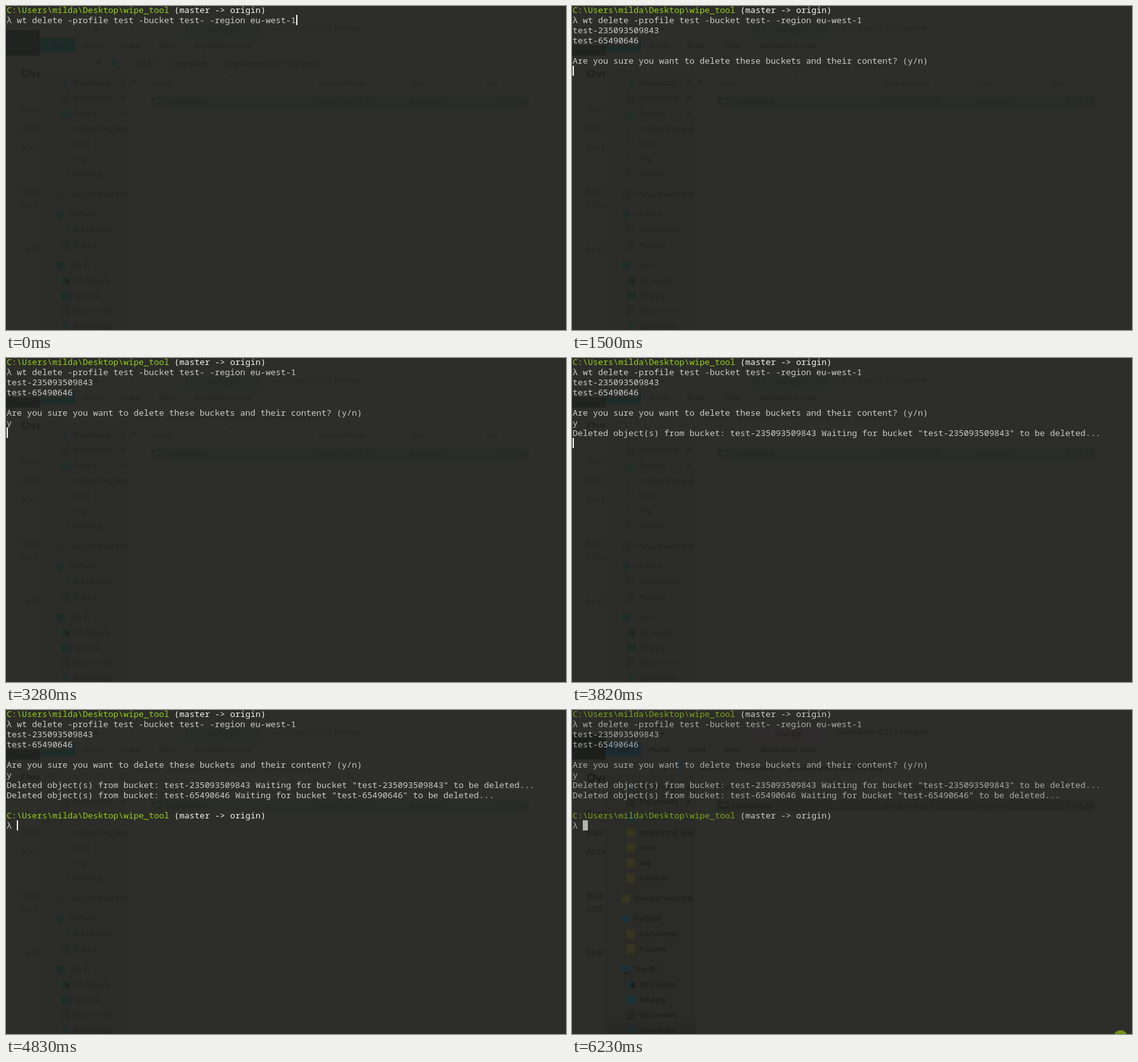
Animation of 882x511 px, one loop 6470 ms. Source, as an HTML page with a canvas:

```html
<!DOCTYPE html>
<html lang="en">
<head>
<meta charset="utf-8">
<title>Terminal session</title>
<style>
html, body { margin: 0; width: 100%; height: 100%; overflow: hidden; background: #2d2d29; }
canvas { display: block; }
</style>
</head>
<body>
<canvas id="stage" width="882" height="511"></canvas>
<script>
const ctx = document.getElementById('stage').getContext('2d');
const LOOP = 6470, BLUR_AT = 6230, CELL = 8, ROW = 16;
const MONO = '13.3333px "Noto Sans Mono", "DejaVu Sans Mono", monospace';
const UI = '"Open Sans", "Noto Sans", sans-serif';
const BASE = '#2d2d29';

const PATH = 'C:\\Users\\milda\\Desktop\\wipe_tool';
const BRANCH = ' (master -> origin)';
const BUCKETS = ['test-235093509843', 'test-65490646'];
const deleted = b => `Deleted object(s) from bucket: ${b}`;
const waiting = b => ` Waiting for bucket "${b}" to be deleted...`;

// [time, row, column, text, kind]
const prints = [
  [0, 0, 0, PATH, 'path'],
  [0, 0, PATH.length, BRANCH, 'bright'],
  [0, 1, 0, 'λ wt delete -profile test -bucket test- -region eu-west-1', 'plain'],
  [1500, 2, 0, BUCKETS[0], 'plain'],
  [1500, 3, 0, BUCKETS[1], 'plain'],
  [1500, 5, 0, 'Are you sure you want to delete these buckets and their content? (y/n)', 'plain'],
  [2890, 6, 0, 'y', 'plain'],
  [3510, 7, 0, deleted(BUCKETS[0]), 'plain'],
  [3820, 7, 48, waiting(BUCKETS[0]), 'plain'],
  [4120, 8, 0, deleted(BUCKETS[1]), 'plain'],
  [4590, 8, 44, waiting(BUCKETS[1]), 'plain'],
  [4830, 10, 0, PATH, 'path'],
  [4830, 10, PATH.length, BRANCH, 'bright'],
  [4830, 11, 0, 'λ', 'plain']
];

// [time, row, column]; a bare time hides the cursor
const cursor = [
  [0, 1, 57], [390], [940, 1, 57], [1180, 2, 0], [1500, 6, 0], [2040], [2590, 6, 0],
  [2890, 6, 1], [3280, 7, 0], [3510, 7, 48], [3820, 8, 0], [4120, 8, 44],
  [4590, 9, 0], [4670, 10, 0], [4830, 11, 2], [5370], [5840, 11, 2]
];

const focused = {
  path: '#93d119', bright: '#f4f4f0', plain: '#cbcdca', cursor: '#f4f4ee',
  ink: '#222420', faint: '#262823', icon: '#1f2d29', folder: '#292b26',
  nav: '#20231f', file: '#1e2c29', tab: '#292c27', row: '#292c27', pane: '#2c2d29'
};
const blurred = {
  path: '#79a81b', bright: '#cfcfca', plain: '#aaaba6', cursor: '#b4b5ae',
  ink: '#1b1c18', faint: '#20211d', icon: '#1b3038', folder: '#37341f',
  nav: '#1d1f1d', file: '#1c2a32', tab: '#302c2d', row: '#292a26', pane: '#2b2c28'
};

function rect(color, x, y, w, h) {
  ctx.fillStyle = color;
  ctx.fillRect(x, y, w, h);
}

function label(text, x, mid, color, size = 11.5, align = 'left', weight = '') {
  ctx.font = `${weight} ${size}px ${UI}`;
  ctx.textAlign = align;
  ctx.fillStyle = color;
  ctx.fillText(text, x, mid + size * 0.36);
}

function stroke(color, width, ...points) {
  ctx.strokeStyle = color;
  ctx.lineWidth = width;
  ctx.beginPath();
  points.forEach(([x, y]) => ctx.lineTo(x, y));
  ctx.stroke();
}

function clipped(x, y, w, h, draw) {
  ctx.save();
  ctx.beginPath();
  ctx.rect(x, y, w, h);
  ctx.clip();
  draw();
  ctx.restore();
}

const icons = {
  folder(x, y, c) { rect(c.folder, x, y - 7, 13, 14); },
  square(x, y, c) { rect(c.folder, x, y - 6, 13, 13); },
  circle(x, y, c) {
    ctx.fillStyle = c.icon;
    ctx.beginPath();
    ctx.arc(x + 7, y, 6, 0, 7);
    ctx.fill();
  },
  down(x, y, c) {
    rect(c.icon, x + 5, y - 7, 4, 7);
    ctx.fillStyle = c.icon;
    ctx.beginPath();
    ctx.moveTo(x + 1, y);
    ctx.lineTo(x + 13, y);
    ctx.lineTo(x + 7, y + 6);
    ctx.fill();
  },
  sheet(x, y, c) {
    ctx.strokeStyle = c.ink;
    ctx.lineWidth = 1;
    ctx.strokeRect(x + 1.5, y - 6.5, 11, 13);
    for (let i = -3; i < 5; i += 3) rect(c.ink, x + 4, y + i, 7, 1);
  },
  picture(x, y, c) {
    rect(c.icon, x, y - 5, 14, 11);
    rect(c.pane, x + 2, y - 3, 10, 3);
  },
  screen(x, y, c) {
    rect(c.icon, x, y - 6, 15, 10);
    rect(c.ink, x + 4, y + 5, 8, 2);
  },
  cube(x, y, c) {
    rect(c.icon, x + 1, y - 5, 13, 11);
    rect(c.ink, x + 7, y - 3, 6, 9);
  },
  desk(x, y, c) { rect(c.icon, x, y - 6, 15, 12); }
};

// [middle, indent, icon, text]
const sidebar = [
  [121, 1, 'down', 'Downloads'], [145, 1, 'sheet', 'Documents'], [169, 1, 'picture', 'Pictures'],
  [193, 1, 'folder', 'notesorting_app'], [217, 1, 'folder', 'icons'], [241, 1, 'folder', 'img'],
  [265, 1, 'folder', 'sandbox'], [297, 0, 'square', 'Tranquil Vault Files'], [329, 0, 'circle', 'FarShelf'],
  [353, 1, 'folder', 'Documents'], [377, 1, 'folder', 'Pictures'], [409, 0, 'screen', 'This PC'],
  [433, 1, 'cube', '3D Objects'], [457, 1, 'desk', 'Desktop'], [481, 1, 'sheet', 'Documents'],
  [505, 1, 'down', 'Downloads']
];

// The windows that shine through the terminal
function drawBehind(c, blur) {
  rect(c.nav, 0, 38, 53, 40);
  clipped(0, 78, 52, 433, () => {
    label('Overview', 23, 107, c.ink, 18, 'left', 'bold');
    [['Buckets', 163], ['Batch', 193], ['Access', 223], ['Block', 293], ['settings', 313], ['Feature', 383]]
      .forEach(([text, y]) => label(text, 23, y, c.faint, 14));
  });
  rect(c.pane, 52, 78, 1, 433);
  rect(c.pane, 53, 102, 141, 409);
  if (blur) rect(c.row, 53, 493, 141, 18);

  rect(c.tab, 282, 27, 119, 23);
  rect(c.file, 53, 50, 56, 23);
  label('Manage', 341, 37, c.faint, 11.5, 'center');
  label('LoopWarbler 2.22.1 Portable', 415, 35, c.faint, 10.8);
  stroke(c.ink, 1.5, [139, 35], [142, 38], [145, 35]);
  [['File', 81], ['Home', 138], ['Share', 196], ['View', 252], ['Application Tools', 341]]
    .forEach(([text, x]) => label(text, x, 62, c.ink, 11.3, 'center'));

  stroke(c.ink, 1.5, [142, 90], [146, 86], [150, 90]);
  stroke(c.ink, 1.5, [146, 86], [146, 95]);
  icons.down(163, 90, c);
  [['This PC', 200], ['Downloads', 261], ['LoopWarbler 2.22.1 Portable', 343]]
    .forEach(([text, x]) => label(text, x, 91, c.ink, 11));
  [248, 331].forEach(x => stroke(c.faint, 1, [x, 88], [x + 3, 91], [x, 94]));

  stroke(c.faint, 1, [350, 112], [353, 109], [356, 112]);
  [['Name', 230], ['Date modified', 491], ['Type', 637], ['Size', 756]]
    .forEach(([text, x]) => label(text, x, 122, c.faint, 11));
  rect(c.row, 227, 141, 597, 19);
  ctx.strokeStyle = c.ink;
  ctx.lineWidth = 1;
  ctx.strokeRect(231.5, 145.5, 14, 8);
  rect(c.ink, 235, 155, 8, 1);
  label('LoopWarbler', 251, 151, c.ink, 11);
  label('04.04.2020 14:21', 491, 151, c.faint, 10.8);
  label('Application', 636, 151, c.faint, 11);
  label('2 521 KB', 822, 151, c.faint, 11, 'right');

  clipped(53, 102, 139, 409, () => {
    for (const [y, indent, icon, text] of sidebar) {
      icons[icon](indent ? 86 : 78, y, c);
      label(text, indent ? 106 : 98, y, c.ink, 11.3);
      if (y < 170) stroke(c.ink, 2, [181, y + 3], [186, y - 3]);
    }
  });
  stroke(c.ink, 1.5, [198, 120], [201, 117], [204, 120]);

  if (blur) {
    ctx.fillStyle = '#73921b';
    ctx.beginPath();
    ctx.arc(864, 516, 11, 0, 7);
    ctx.fill();
  }
}

function drawTerminal(t, c, blur) {
  const shown = prints.filter(p => p[0] <= t);
  // While focused, each printed line hides what lies behind it
  if (!blur) {
    for (const [, row, col, text] of shown) {
      rect(BASE, col ? 1 + col * CELL : 0, row * ROW - 2, text.length * CELL + (col ? 0 : 1), ROW);
    }
  }
  ctx.font = MONO;
  ctx.textAlign = 'left';
  for (const [, row, col, text, kind] of shown) {
    ctx.fillStyle = c[kind];
    ctx.fillText(text, 1 + col * CELL, row * ROW + 11);
  }
  const [, row, col] = cursor.filter(k => k[0] <= t).pop();
  if (row !== undefined) rect(c.cursor, 1 + col * CELL, row * ROW - 2, blur ? CELL : 2, ROW);
}

function frame(now) {
  const t = now % LOOP, blur = t >= BLUR_AT, colors = blur ? blurred : focused;
  rect(BASE, 0, 0, 882, 511);
  drawBehind(colors, blur);
  drawTerminal(t, colors, blur);
  requestAnimationFrame(now => frame(now - start));
}

const start = performance.now();
frame(0);
</script>
</body>
</html>
```
